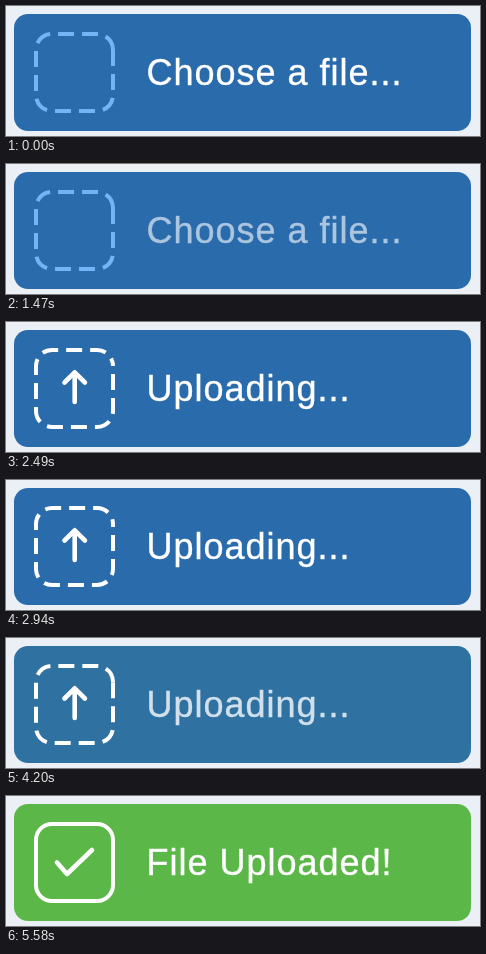
An HTML page that plays this animation: 474 by 130 pixels, repeating every 7.27 s.

```html
<!DOCTYPE html>
<html lang="en">
<head>
<meta charset="utf-8">
<title>File upload button</title>
<style>
  html, body { margin: 0; width: 100%; height: 100%; overflow: hidden; background: #ebf0f7; }
  svg { display: block; width: 474px; height: 130px; }
  text { font: 36px "Liberation Sans", Arial, sans-serif; letter-spacing: 1px; fill: #fff; stroke: #fff; stroke-width: 0.4; }
  .line { fill: none; stroke: #fff; stroke-width: 4; }
  .round { stroke-width: 4.6; stroke-linecap: round; stroke-linejoin: round; }
</style>
</head>
<body>
<svg viewBox="0 0 474 130">
  <rect id="button" x="8" y="8" width="457" height="117" rx="14"/>
  <g id="upload">
    <path id="dashes" class="line" stroke-dasharray="16 8"
      d="M107 44V89a16 16 0 0 1 -16 16H46a16 16 0 0 1 -16 -16V44a16 16 0 0 1 16 -16H91a16 16 0 0 1 16 16z"/>
    <path id="arrow" class="line round" d="M68.7 80V51M58.5 60.5L68.7 50.3L78.9 60.5"/>
  </g>
  <g id="done">
    <rect class="line" x="30" y="28" width="77" height="77" rx="16"/>
    <path class="line round" d="M51 66.5L61 78L86 54"/>
  </g>
  <text id="choose" x="140.4" y="79">Choose a file...</text>
  <text id="uploading" x="140.4" y="79">Uploading...</text>
  <text id="uploaded" x="140.4" y="79">File Uploaded!</text>
</svg>
<script>
const LOOP = 7270;
const FADE = 300;
const START = 1355, MARCH = 1635, FINISH = 4135, DONE = 4435;
const MARCH_SPEED = 280 / 6000; // once round the outline in six seconds
const BLUE = [42, 107, 172], GREEN = [91, 184, 72];
const PALE = [114, 180, 245], WHITE = [255, 255, 255];

const el = id => document.getElementById(id);
const progress = (t, start, length) => Math.min(1, Math.max(0, (t - start) / length));
const easeInOut = p => p < 0.5 ? 2 * p * p : 1 - 2 * (1 - p) ** 2;
const easeOut = p => p >= 1 ? 1 : 1 - 2 ** (-10 * p);
const mix = (a, b, p) => `rgb(${a.map((v, i) => Math.round(v + (b[i] - v) * p))})`;
const fade = (id, opacity) => el(id).setAttribute("opacity", opacity);

function draw(t) {
  const active = progress(t, MARCH, FADE);
  el("button").setAttribute("fill", mix(BLUE, GREEN, easeInOut(progress(t, FINISH, FADE))));
  el("dashes").style.stroke = mix(PALE, WHITE, active);
  el("dashes").setAttribute("stroke-dashoffset", Math.max(0, t - MARCH) * MARCH_SPEED);

  fade("arrow", active);
  fade("upload", 1 - progress(t, 4215, DONE - 4215));
  fade("done", easeOut(progress(t, DONE, 1400)));

  fade("choose", 1 - progress(t, START, FADE));
  fade("uploading", active * (1 - progress(t, FINISH, FADE)));
  fade("uploaded", progress(t, DONE, FADE));
}

const begin = performance.now();
function tick() {
  draw((performance.now() - begin) % LOOP);
  requestAnimationFrame(tick);
}
tick();
</script>
</body>
</html>
```
